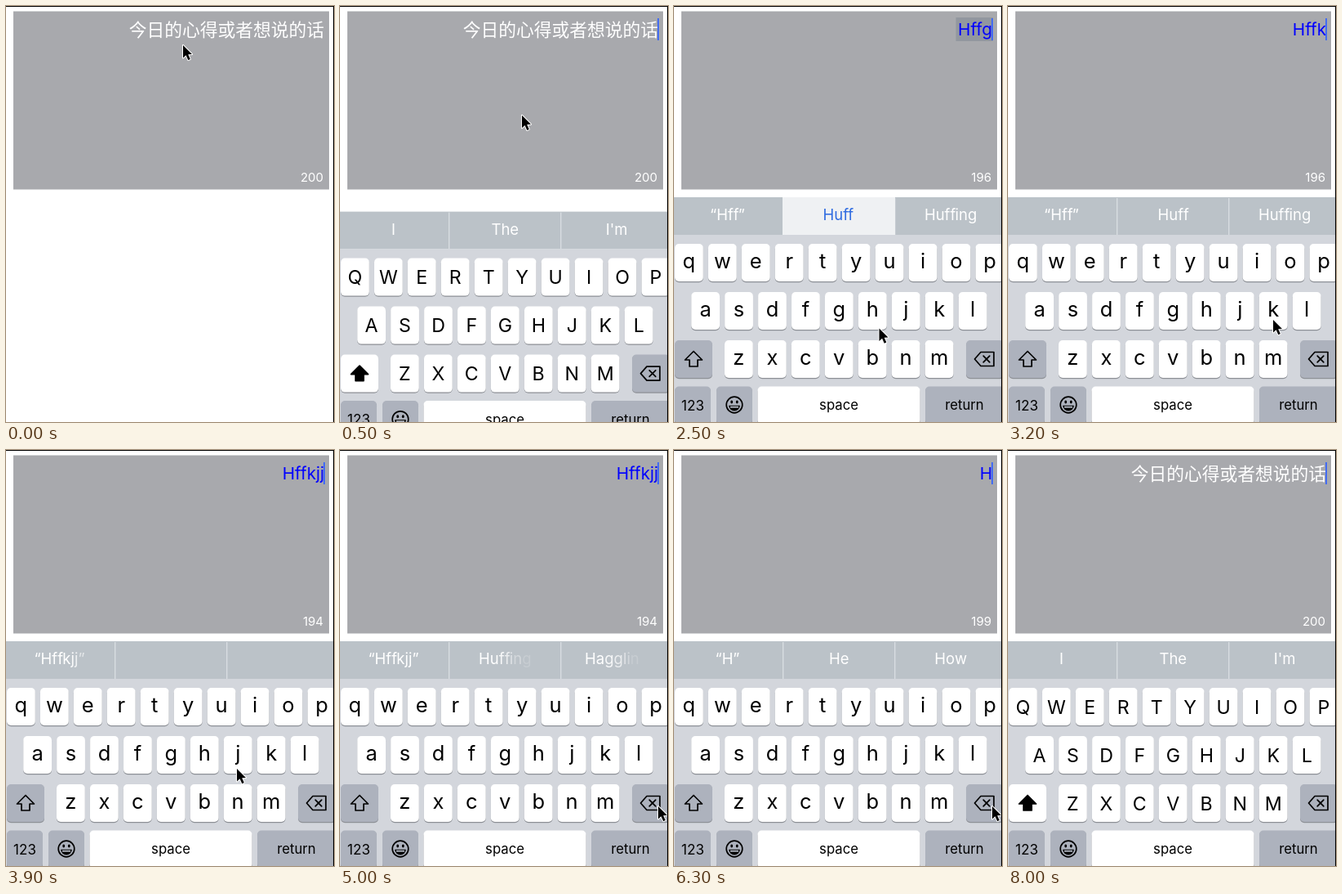
Animation of 402x509 px, one loop 8.4 s. Source, as an HTML page with a canvas:

```html
<!DOCTYPE html>
<html lang="zh">
<head>
<meta charset="utf-8">
<style>
html, body { margin: 0; height: 100%; overflow: hidden; background: #fff; }
canvas { display: block; }
</style>
</head>
<body>
<canvas id="stage" width="402" height="509"></canvas>
<script>
const g = document.getElementById('stage').getContext('2d');
const LOOP = 8400, STEP = 100;
const HINT = '今日的心得或者想说的话';
const LATIN = 'Inter, Roboto, sans-serif', CJK = '"Noto Sans CJK SC", "Noto Sans CJK", sans-serif';

// Where the pointer rests for each key
const spots = { start: [217, 48], h: [240, 379], f: [160, 378], g: [203, 380], k: [325, 384],
  j: [283, 390], '<': [390, 436], exit: [414, 436] };

// Key presses; '<' deletes, long names only move the pointer
const strokes = [[0, 'start'], [1400, 'h'], [1800, 'f'], [2000, 'f'], [2200, 'g'], [2900, '<'],
  [3200, 'k'], [3400, 'j'], [3500, 'j']];
for (let i = 0; i < 5; i++) strokes.push([5200 + 175 * i, '<']);
strokes.push([6900, '<'], [7600, 'exit']);

const guesses = { '': ['I', 'The', 'I\'m'], H: ['“H”', 'He', 'How'],
  Hff: ['“Hff”', 'Huff', 'Huffing'], Hffkjj: ['“Hffkjj”', '', ''] };

// Typed text and suggestions follow from the key presses
const typed = [], hints = [[4700, ['“Hffkjj”', 'Huffing', 'Haggling']]];
let line = '';
for (const [t, k] of strokes) {
  if (k === '<') line = line.slice(0, -1);
  else if (k.length === 1) line += line ? k : k.toUpperCase();
  typed.push([t, line]);
  if (guesses[line]) hints.push([t, guesses[line]]);
}
hints.sort((a, b) => a[0] - b[0]);

const clamp = v => Math.max(0, Math.min(1, v));
const indexAt = (list, t) => list.findLastIndex(e => e[0] <= t);

function box(x, y, w, h, color) {
  g.fillStyle = color;
  g.fillRect(x, y, w, h);
}

function text(s, x, y, size, color, align = 'center', family = LATIN) {
  g.font = `400 ${size}px ${family}`;
  g.textAlign = align;
  g.fillStyle = color;
  g.fillText(s, x, y);
}

function key(x, y, w, color = '#fff') {
  for (const [dy, c] of [[1.2, '#8d9096'], [0, color]]) {
    g.fillStyle = c;
    g.beginPath();
    g.roundRect(x, y + dy, w, 46, 5);
    g.fill();
  }
}

function shape(points, fill, stroke, width = 1.7) {
  g.beginPath();
  points.forEach(([x, y]) => g.lineTo(x, y));
  g.closePath();
  g.lineWidth = width;
  g.lineJoin = 'round';
  if (stroke) { g.strokeStyle = stroke; g.stroke(); }
  if (fill) { g.fillStyle = fill; g.fill(); }
}

function face(x, y) {
  g.strokeStyle = g.fillStyle = '#000';
  g.lineWidth = 1.7;
  g.beginPath();
  g.arc(x, y, 9.8, 0, 7);
  g.stroke();
  for (const dx of [-3.3, 3.3]) {
    g.beginPath();
    g.ellipse(x + dx, y - 3.4, 1.4, 2, 0, 0, 7);
    g.fill();
  }
  g.beginPath();
  g.arc(x, y + 0.7, 6.8, 0, Math.PI);
  g.closePath();
  g.fill();
  box(x - 5, y + 1.7, 10, 2, '#adb2bd');
}

// Letters fade one after another
function word(s, x, alpha) {
  g.font = `400 18.5px ${LATIN}`;
  const left = x - g.measureText(s).width / 2;
  [...s].forEach((c, i) => {
    const dx = g.measureText(s.slice(0, i)).width;
    g.globalAlpha = clamp(alpha(i));
    text(c, left + dx, 262, 18.5, '#fff', 'left');
  });
  g.globalAlpha = 1;
}

function suggestions(t, chosen) {
  box(0, 234, 402, 46, '#bbc2c8');
  for (const x of [133, 270]) box(x, 235, 1.4, 45, '#d8dde1');
  if (chosen) box(133, 234, 138, 46, '#eff1f3');
  const n = indexAt(hints, t), [since, words] = hints[n];
  const old = n ? hints[n - 1][1] : words, dt = t - since;
  words.forEach((w, i) => {
    const x = 65.5 + i * 136.8;
    if (chosen && i === 1) return text(w, x - 1, 262, 18.5, '#2f6be0');
    if (w === old[i]) return word(w, x, () => 1);
    word(old[i], x, k => 1 - (dt - 45 * k) / 130);
    word(w, x, k => (dt - 90 - 30 * k) / 170);
  });
}

function keyboard(t, upper) {
  const grey = '#adb2bd';
  box(0, 280, 402, 229, '#d3d6dc');
  ['qwertyuiop', 'asdfghjkl', 'zxcvbnm'].forEach((row, r) => {
    const y = 291 + 59 * r;
    [...row].forEach((c, i) => {
      const x = [1, 21.2, 62][r] + i * 40.95;
      key(x, y, 34.8);
      if (upper) text(c.toUpperCase(), x + 17.4, y + 31.7, 23.2, '#000');
      else text(c, x + 17.4, y + 30.3, 25.5, '#000');
    });
  });

  key(1, 409, 46, upper ? '#fff' : grey);
  shape([[24, 422.5], [34.5, 433], [29, 433], [29, 441], [19, 441], [19, 433], [13.5, 433]],
    upper && '#000', '#000');

  const down = strokes.some(([s, k]) => k === '<' && t >= s - 100 && t < s + 50);
  key(358, 409, 46, down ? '#fff' : grey);
  shape([[368.5, 432], [376, 423.5], [392, 423.5], [392, 440.5], [376, 440.5]], down && '#000', '#000');
  for (const s of [-1, 1])
    shape([[379.2, 432 - 3.8 * s], [386.8, 432 + 3.8 * s]], null, down ? '#fff' : '#000');

  key(1, 465.5, 44, grey);
  key(52, 465.5, 44, grey);
  key(102.5, 465.5, 199);
  key(308, 465.5, 98, grey);
  text('123', 23, 494.5, 17, '#000');
  text('space', 202, 494, 16.7, '#000');
  text('return', 356, 494, 16.7, '#000');
  face(74, 488);
}

// Rests after a press, then travels to the next key and waits there
function pointer(t) {
  const n = indexAt(strokes, t), [t0, from] = strokes[n], [t1, to] = strokes[n + 1] || [LOOP, from];
  const leave = Math.max(t0 + 100, t1 - 1100);
  const k = clamp((t - leave) / Math.min(600, t1 - leave)), e = k * k * (3 - 2 * k);
  const [x, y] = spots[from].map((v, i) => v + (spots[to][i] - v) * e);
  g.save();
  g.translate(x, y);
  shape([[0, 0], [0, 15.5], [3.6, 12.2], [6.3, 18.2], [8.8, 17.1], [6.2, 11.3], [11, 11]], '#000', '#fff', 2);
  g.restore();
}

function draw(t) {
  const s = typed[indexAt(typed, t)][1], chosen = s === 'Hffg';
  box(0, 0, 402, 509, '#fff');
  box(9, 6.5, 387, 218, '#a8a9ad');
  if (s) {
    g.font = `400 20.7px ${LATIN}`;
    const w = g.measureText(s).width;
    if (chosen) box(387.5 - w, 14, w + 3.5, 29, '#92979f');
    text(s, 390, 36, 20.7, '#00f', 'right');
  } else {
    text(HINT, 390, 36.5, 21.75, '#fff', 'right', CJK);
  }
  text(200 - s.length, 389, 215, 15, '#fff', 'right');

  // The caret blinks while nothing is typed
  const hidden = t < 300 || [4400, 7400].some(b => t >= b && t < b + 500);
  if (!hidden) box(389, 15, 2, 27, '#426bf2');

  const up = clamp((t - 200) / 500);
  if (up) {
    g.save();
    g.translate(0, 275 * (1 - up) ** 3);
    suggestions(t, chosen);
    keyboard(t, !s);
    g.restore();
  }
  pointer(t);
  box(0, 0, 402, 1, '#000');
  box(401, 0, 1, 509, '#000');
}

function tick() {
  const t = performance.now() % LOOP;
  draw(Math.floor(t / STEP) * STEP);
  requestAnimationFrame(tick);
}
tick();
</script>
</body>
</html>
```
